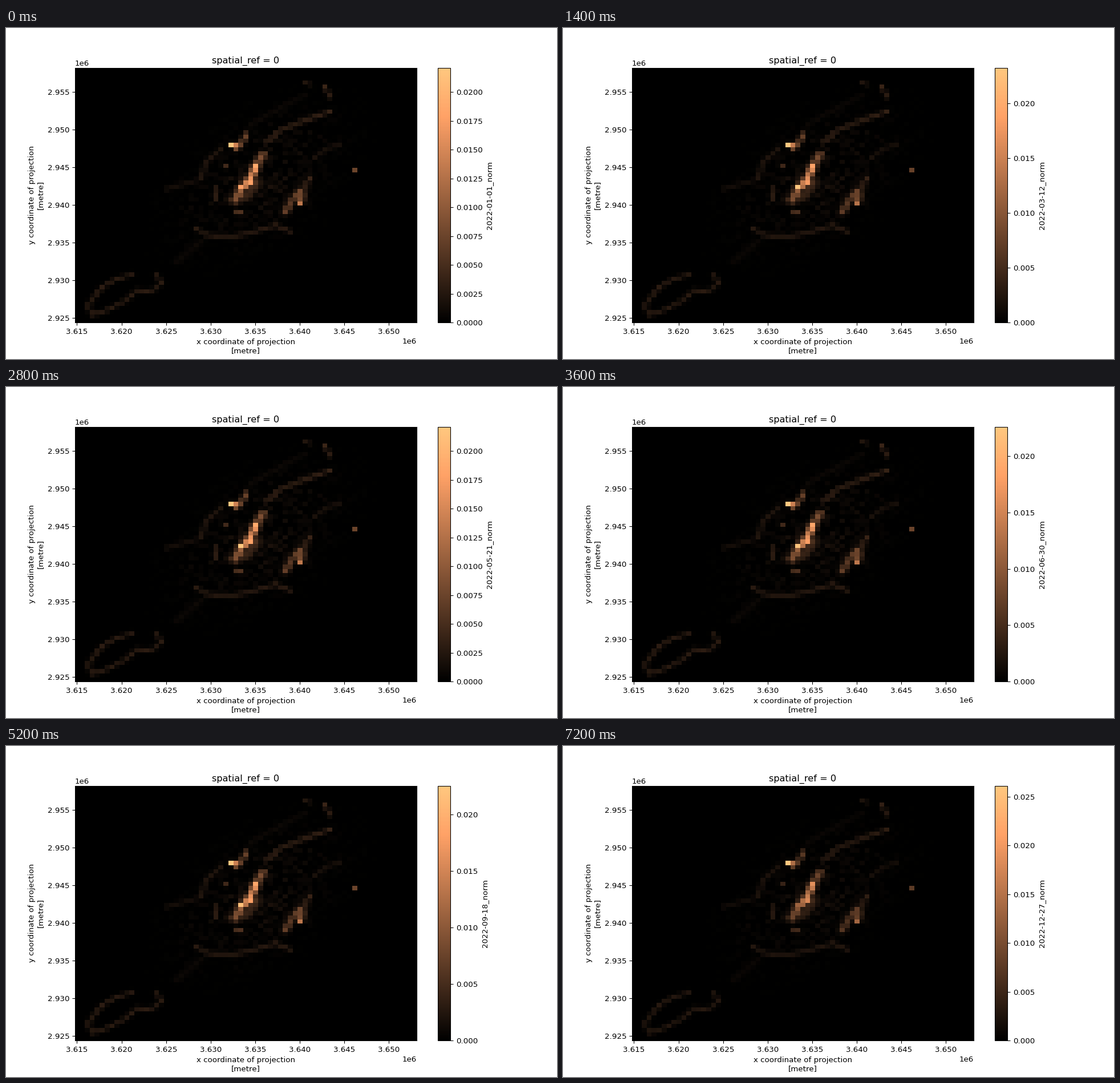
These frames come from a looping animation (966 by 580 pixels, 7400 ms). A matplotlib script:

```python
import numpy as np
import matplotlib.pyplot as plt
from matplotlib.animation import FuncAnimation

DPI = 96.6
COLS, ROWS, CELL = 69, 61, 555.35
LEFT, BOTTOM = 3614767, 2924360
STEPS, DAYS = 37, 10
UNIT = 0.0221          # value of a cell with relative level 1

# Glowing paths: level, width, then (col, row) points with rows from the top
PATHS = [
    # south-west loop
    (.13, .55, (11, 49), (8, 50), (5, 52), (2, 56.5), (3, 58.5)),
    (.13, .55, (3, 58.7), (6, 57.5), (10, 55), (12, 52.7), (15, 53), (17, 51), (16, 49)),
    # south coast
    (.04, .8, (20, 46), (25, 41)),
    (.13, .6, (24, 38), (26, 39.5), (31, 40), (35, 39), (40, 37.3), (43, 38.7)),
    (.25, .4, (32, 34), (33, 34)),
    # west coast
    (.07, .6, (18, 28.5), (24, 26.5)),
    (.11, .6, (25, 26), (26, 22), (29, 19)),
    (.33, .6, (32, 19), (33, 18), (34, 15.5)),
    (.13, .6, (28, 28), (28, 31)),
    (.18, .4, (30, 23)),
    (.75, .4, (32, 18)),
    # north-east coast
    (.04, .7, (35, 13), (46, 6)),
    (.16, .6, (38, 17.5), (41, 14.5), (44, 13), (47, 11.7), (51, 10)),
    (.12, .5, (46, 3), (47, 3.5)),
    (.17, .5, (50, 4), (51, 6.5)),
    (.08, .6, (48, 21), (50, 19), (53, 18)),
    (.42, .4, (56, 24)),
    # eastern cluster
    (.17, .6, (45, 29), (47, 26)),
    (.4, 1, (45, 29.3), (45, 31)),
    (.28, .8, (44, 30), (42, 34)),
    (.6, .5, (45, 32)),
    # central ridge
    (.45, .85, (37.4, 20.3), (36, 23)),
    (.85, .85, (36, 23.3), (34.5, 27), (33, 28.5)),
    (.42, 1.1, (33, 29), (32, 31)),
    (.22, 1.3, (36, 27), (34, 30)),
    (.9, .4, (35, 27)),
]


def distance(cols, rows, start, end):
    """Distance of every cell from a line segment."""
    (x, y), (x2, y2) = start, end
    dx, dy = x2 - x, y2 - y
    length = dx * dx + dy * dy or 1
    t = np.clip(((cols - x) * dx + (rows - y) * dy) / length, 0, 1)
    return np.hypot(cols - x - t * dx, rows - y - t * dy)


def base_grid():
    rng = np.random.default_rng(7)
    rows, cols = np.mgrid[:ROWS, :COLS]
    # faint dust along the slanted body of the map
    along = ((cols - 37) - (rows - 26)) / 24
    across = ((cols - 37) + (rows - 26)) / 14
    grid = .09 * rng.random((ROWS, COLS)) ** 3 * np.exp(-along ** 2 - across ** 2)
    for level, width, *points in PATHS:
        for start, end in zip(points, points[1:] or points):
            glow = level * np.exp(-(distance(cols, rows, start, end) / width) ** 2)
            grid = np.maximum(grid, glow)
    return UNIT * grid * rng.uniform(.8, 1.15, grid.shape)


def scale(step):
    """Top of the colour scale, also the value of the brightest western cell."""
    return np.interp(step, [0, 4, 10, 14, 18, 22, 25, 30, 33, 36],
                     [.0221, .01734, .02917, .0221, .0226, .02271,
                      .0221, .02419, .0222, .02613])


def central_peak(step):
    return np.interp(step, [0, 4, 10, 18, 30, 36],
                     [.0178, .0171, .0292, .0222, .0214, .013])


BASE = base_grid()


def values(step):
    data = BASE.copy()
    data[18, 31] = scale(step)
    data[28, 33] = central_peak(step)
    return data


# the small surplus keeps the pixel size from rounding down
fig, ax = plt.subplots(figsize=(966.001 / DPI, 580.001 / DPI), dpi=DPI)
x_edges = LEFT + CELL * np.arange(COLS + 1)
y_edges = BOTTOM + CELL * np.arange(ROWS, -1, -1)
mesh = ax.pcolormesh(x_edges, y_edges, values(0), cmap="copper", vmin=0, vmax=scale(0))
ax.set_xlim(x_edges[0], x_edges[-1])
ax.set_ylim(y_edges[-1], y_edges[0])
ax.set_title("spatial_ref = 0")
ax.set_xlabel("x coordinate of projection\n[metre]")
ax.set_ylabel("y coordinate of projection\n[metre]")
bar = fig.colorbar(mesh, ax=ax)


def update(step):
    mesh.set_array(values(step))
    mesh.set_clim(0, scale(step))
    day = np.datetime64("2022-01-01") + np.timedelta64(DAYS * int(step), "D")
    bar.set_label(f"{day}_norm")
    return [mesh]


anim = FuncAnimation(fig, update, frames=STEPS, init_func=lambda: update(0),
                     interval=200, repeat=True, repeat_delay=0, blit=False)
plt.show()
```
